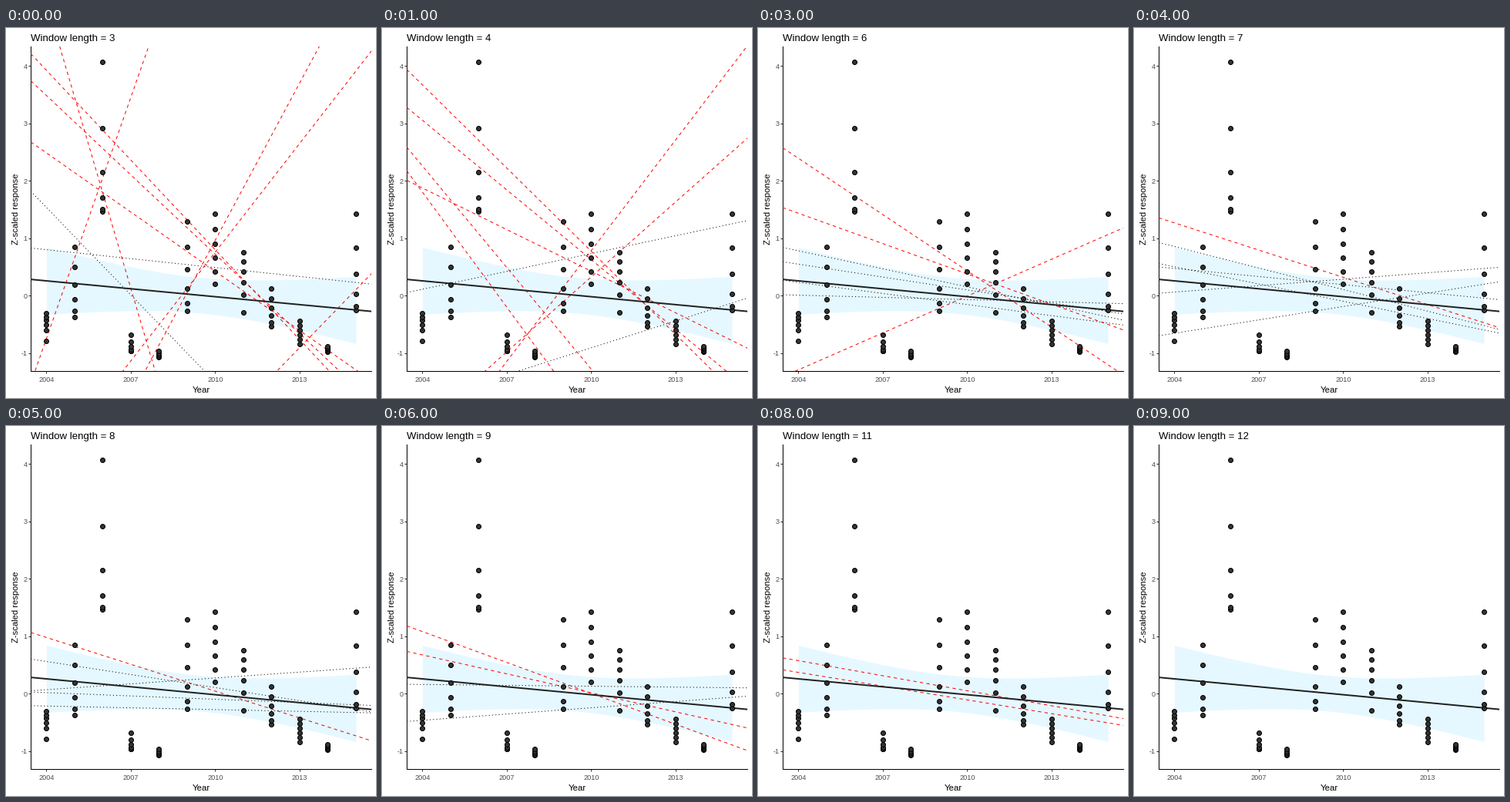
These frames come from a looping animation (480x480 px, 10 s). A matplotlib script:

```python
import numpy as np
import matplotlib.pyplot as plt
from matplotlib.animation import FuncAnimation

SIZE = 480
DPI = 80
PX = 72 / DPI  # points per pixel
LEFT, RIGHT, TOP, BOTTOM = 32.2, 474.1, 24.2, 445.4
X_LIM = (2003.45, 2015.55)
Y_LIM = (-1.32, 4.335)
GREY = "#4d4d4d"

plt.rcParams["font.family"] = "Liberation Sans"

# Each year: lowest and highest response, and the power that bends the steps between.
YEARS = np.arange(2004, 2016)
LOW = np.array([-.79, -.37, 1.46, -.97, -1.07, -.27, .20, -.29, -.54, -.84, -.98, -.26])
HIGH = np.array([-.31, .85, 4.07, -.69, -.97, 1.29, 1.42, .75, .12, -.44, -.88, 1.43])
BEND = np.array([.58, 1.53, 2.6, 2.45, 2, 1.5, 1.07, .77, 1.35, 1, 1.4, 1.93])
PER_YEAR = 6
STEPS = np.linspace(0, 1, PER_YEAR)
VALUES = LOW[:, None] + (HIGH - LOW)[:, None] * STEPS ** BEND[:, None]


class Fit:
    """Least-squares line through a run of years."""

    def __init__(self, start, length):
        y = VALUES[start:start + length].ravel()
        x = np.repeat(YEARS[start:start + length], PER_YEAR)
        self.n = len(y)
        self.mx, self.my = x.mean(), y.mean()
        dx = x - self.mx
        self.sxx = (dx ** 2).sum()
        self.slope = (dx * y).sum() / self.sxx
        rss = ((y - self.at(x)) ** 2).sum()
        self.sigma = np.sqrt(rss / (self.n - 2))

    def at(self, x):
        return self.my + self.slope * (np.asarray(x) - self.mx)

    def significant(self):
        df = self.n - 2
        t_crit = 1.96 + 2.37 / df + 2.8 / df ** 2  # two-sided 5 %
        return abs(self.slope) * np.sqrt(self.sxx) / self.sigma > t_crit

    def band(self, x, t=2.648):  # 99 % confidence
        return t * self.sigma * np.sqrt(1 / self.n + (x - self.mx) ** 2 / self.sxx)


fig = plt.figure(figsize=(SIZE / DPI, SIZE / DPI), dpi=DPI, facecolor="white")
ax = fig.add_axes([LEFT / SIZE, 1 - BOTTOM / SIZE,
                   (RIGHT - LEFT) / SIZE, (BOTTOM - TOP) / SIZE])
ax.set(xlim=X_LIM, ylim=Y_LIM)
ax.spines[["top", "right"]].set_visible(False)
ax.spines[["left", "bottom"]].set_linewidth(PX)
x_ticks, y_ticks = range(2004, 2014, 3), range(-1, 5)
ax.set_xticks(x_ticks, [])
ax.set_yticks(y_ticks, [])
ax.tick_params(length=3 * PX, width=PX, color="#333333")


def label(x, y, text, size, color="black", **kw):
    return fig.text(x / SIZE, 1 - y / SIZE, text, fontsize=size * PX,
                    color=color, va="baseline", **kw)


def to_px(v, lim, start, end):
    return start + (v - lim[0]) / (lim[1] - lim[0]) * (end - start)


for year in x_ticks:
    label(to_px(year, X_LIM, LEFT, RIGHT), 459, str(year), 9.1, GREY, ha="center")
for v in y_ticks:
    label(27.5, to_px(v, Y_LIM, BOTTOM, TOP) + 3.5, str(v), 9.1, GREY, ha="right")
label(253, 473, "Year", 11.4, ha="center")
label(15.5, 234.5, "Z-scaled response", 11.3, ha="center",
      rotation=90, rotation_mode="anchor")
title = label(31.5, 17, "", 13.2, ha="left")

ends = np.array(X_LIM)
trend = Fit(0, len(YEARS))
grid = np.linspace(2004, 2015, 80)
mid, half = trend.at(grid), trend.band(grid)
ax.fill_between(grid, mid - half, mid + half, color="#e5f8ff", linewidth=0, zorder=1)
ax.plot(ends, trend.at(ends), color="#222222", lw=2 * PX, zorder=4)
ax.plot(np.repeat(YEARS, PER_YEAR), VALUES.ravel(), "o", ms=6 * PX,
        mfc="#333333", mec="black", mew=PX, zorder=5)

lines = [ax.plot([], [], lw=PX, dash_capstyle="butt", zorder=3)[0]
         for _ in range(10)]


def draw(i):
    length = i + 3
    title.set_text(f"Window length = {length}")
    for start, line in enumerate(lines):
        shown = start + length <= len(YEARS)
        line.set_visible(shown)
        if not shown:
            continue
        fit = Fit(start, length)
        line.set_data(ends, fit.at(ends))
        if fit.significant():
            line.set(color="red", linestyle=(0, (4.3, 4.3)))
        else:
            line.set(color="black", linestyle=(0, (1.07, 3.2)))
    return [title, *lines]


anim = FuncAnimation(fig, draw, frames=10, interval=1000, repeat=True,
                     repeat_delay=0, blit=False)
plt.show()
```
